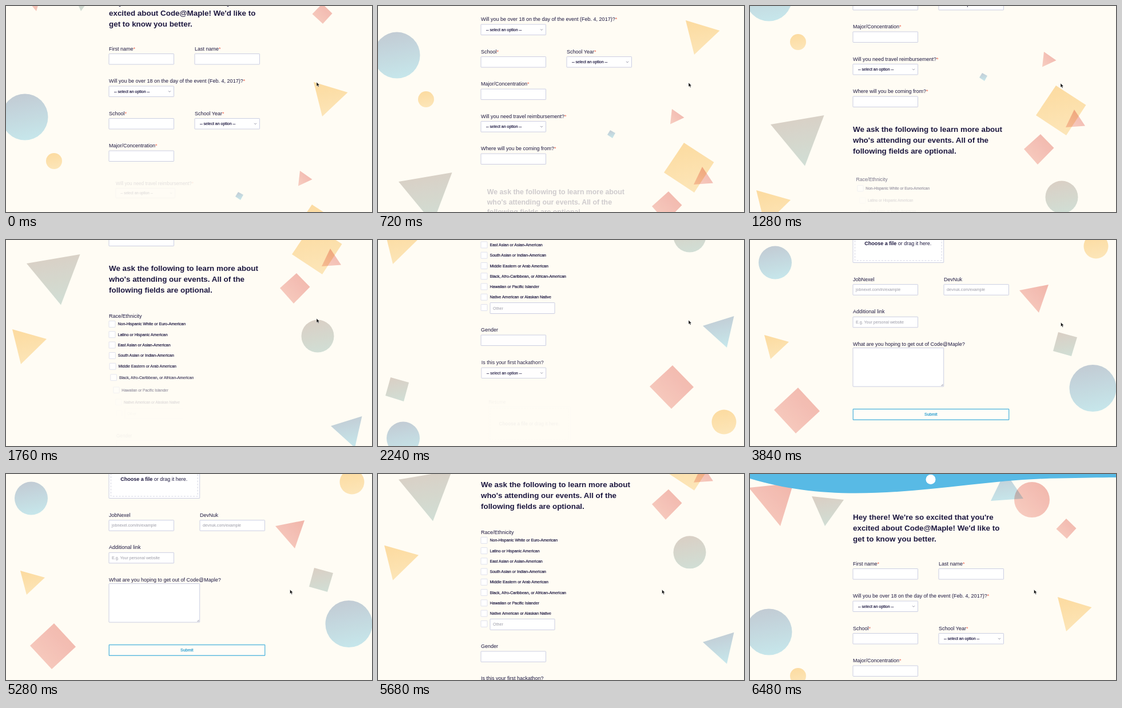
Recreate the animation shown at these times as an HTML page. Size 640 by 360 pixels, loop 6560 ms.

```html
<!DOCTYPE html>
<html lang="en">
<head>
<meta charset="utf-8">
<title>Registration form</title>
<style>
html, body { margin: 0; width: 100%; height: 100%; overflow: hidden; background: #fffcf4; }
svg { display: block; width: 100%; height: 100%; }
text { font: 9px "Liberation Sans", Arial, sans-serif; fill: #1d1840; white-space: pre; }
.head { font-size: 13.4px; font-weight: 700; }
.small { font-size: 7px; stroke: #1d1840; stroke-width: .2; }
.hint { font-size: 7.1px; fill: #9a9aa6; }
.submit { font-size: 7.2px; fill: #35a3d0; stroke: #35a3d0; stroke-width: .25; text-anchor: middle; }
.star { fill: #f0654f; }
.bold { font-weight: 700; }
.box { fill: #fff; stroke: #c6c9df; stroke-width: .9; }
.check { fill: #fff; stroke: #dcdeeb; stroke-width: .9; }
.dash { fill: none; stroke: #c9cbdc; stroke-width: .8; stroke-dasharray: 3 2.4; }
.line { fill: none; stroke: #77778c; stroke-width: .8; }
.button { fill: #fffdf8; stroke: #62bcdf; stroke-width: 1.4; }
#shapes > * { fill-opacity: .7; mix-blend-mode: multiply; }
</style>
</head>
<body>
<svg id="stage" viewBox="0 0 640 360" xmlns="http://www.w3.org/2000/svg">
  <defs id="defs"></defs>
  <rect width="640" height="360" fill="#fffcf4"/>
  <g id="page">
    <g id="shapes"></g>
    <path fill="#58bae5" d="M0-60V8C60 26 120 33.500 185 33.500C310 33.500 420 9 540 7.500C580 7 610 6 640 6V-60Z"/>
    <circle cx="316" cy="9.500" r="8.500" fill="#fff"/>
    <g id="form"></g>
  </g>
  <path id="cursor" d="M0 0V7.300L1.700 5.800L2.900 8.400L4.200 7.800L3.100 5.300H5.300Z" fill="#111" stroke="#fff" stroke-width=".5"/>
</svg>
<script>
(() => {
const LOOP = 6560, STEP = 80;
const $ = id => document.getElementById(id);

function add(parent, tag, attrs, str) {
  const el = document.createElementNS('http://www.w3.org/2000/svg', tag);
  for (const k in attrs) el.setAttribute(k, attrs[k]);
  if (str !== undefined) el.textContent = str;
  parent.appendChild(el);
  return el;
}

// Background shapes
const tints = {
  red: ['#eb9891', '#f4beb5'],
  yellow: ['#fbd083', '#fbdfa6'],
  blue: ['#a8b9cf', '#aee0f2'],
  grey: ['#cabfb8', '#bdd4d1']
};
for (const id in tints) {
  const flip = id === 'red';
  const grad = add($('defs'), 'linearGradient', {
    id, x1: flip ? 1 : .3, y1: 0, x2: flip ? 0 : .5, y2: 1
  });
  tints[id].forEach((c, i) => add(grad, 'stop', { offset: i, 'stop-color': c }));
}
const poly = (tint, points) => add($('shapes'), 'polygon', { points, fill: `url(#${tint})` });
const disc = (tint, cx, cy, r) => add($('shapes'), 'circle', { cx, cy, r, fill: `url(#${tint})` });

poly('red', '-2,24 76,16 53,91');
poly('grey', '108,39 164,45 131,91');
poly('blue', '446,-4 478,43 421,47');
disc('red', 493, 45, 31);
poly('red', '553,78 570.5,95 554,113 535.5,96');
poly('yellow', '538,215 597.5,233 553,275');
disc('blue', 33, 276, 40.5);
disc('yellow', 84, 353, 14);
poly('blue', '406,407 415,412 410,421 401,415');
poly('red', '514,370 535.5,385 511,396.5');
poly('yellow', '535,429 587.5,463 553,516 500,481');
poly('red', '567,471 586,499.5 552,502');
poly('red', '508,514 531.5,538 503,567 479,540');
disc('grey', 545, 624, 28.5);
poly('grey', '36,497 129.5,481 96,569.5');
poly('yellow', '11,612 71,629 26,673');
poly('blue', '568,781 622.5,764 610,819');
poly('red', '515,850 552,888 513,926 475,887');
disc('yellow', 605, 949, 21.5);
poly('grey', '22,871 54,880 45,913 13,903');
disc('blue', 44, 977.5, 29);
poly('red', '471,1026 522,1016 505,1065');
poly('grey', '539,1099 572,1108 562,1141 530,1132');
poly('yellow', '25,1104 68,1116 36,1146');
disc('blue', 599.5, 1197, 41);
poly('red', '84,1196 122,1237 80,1276 42,1235');

// Form parts
const reveals = [];
const LEFT = 180, FIELD_W = 113.5, FIELD_H = 18.5;
const rect = (g, cls, x, y, width, height) =>
  add(g, 'rect', { class: cls, x, y, width, height, rx: .6 });
const text = (g, x, y, str, cls = '') => add(g, 'text', { x, y, class: cls }, str);

// A group that fades, rises and grows into place at the given time
function reveal(start, cy) {
  const el = add($('form'), 'g', {});
  reveals.push({ el, start, cy });
  return el;
}
function label(g, x, y, str, required) {
  const el = text(g, x, y, str);
  if (required) add(el, 'tspan', { class: 'star' }, '*');
}
function input(g, x, y, str, required, hint) {
  label(g, x, y, str, required);
  rect(g, 'box', x, y + 6, FIELD_W, FIELD_H);
  if (hint) text(g, x + 5, y + 17.6, hint, 'hint');
}
function select(g, x, y, str, required) {
  input(g, x, y, str, required);
  text(g, x + 9, y + 17.7, '-- select an option --', 'small');
  add(g, 'path', { class: 'line', d: `M${x + 104} ${y + 14.3}l2 2l2-2` });
}
const heading = (g, y, lines) =>
  lines.forEach((s, i) => text(g, LEFT, y + i * 19.2, s, 'head'));

const intro = $('form');
heading(intro, 80, [
  "Hey there! We're so excited that you're",
  "excited about Code@Maple! We'd like to",
  'get to know you better.'
]);
input(intro, LEFT, 159.5, 'First name', true);
input(intro, 330, 159.5, 'Last name', true);
select(intro, LEFT, 216, 'Will you be over 18 on the day of the event (Feb. 4, 2017)?', true);
input(intro, LEFT, 272.5, 'School', true);
select(intro, 330, 272.5, 'School Year', true);
input(intro, LEFT, 329, 'Major/Concentration', true);
select(reveal(-120, 394), LEFT, 385.5, 'Will you need travel reimbursement?', true);
input(reveal(100, 450), LEFT, 442, 'Where will you be coming from?', true);
heading(reveal(560, 524), 510, [
  'We ask the following to learn more about',
  "who's attending our events. All of the",
  'following fields are optional.'
]);
label(reveal(1043, 589), LEFT, 592, 'Race/Ethnicity');

[
  'Non-Hispanic White or Euro-American',
  'Latino or Hispanic American',
  'East Asian or Asian-American',
  'South Asian or Indian-American',
  'Middle Eastern or Arab American',
  'Black, Afro-Caribbean, or African-American',
  'Hawaiian or Pacific Islander',
  'Native American or Alaskan Native',
  ''
].forEach((group, i) => {
  const y = 603 + i * 18.25;
  const g = reveal(1070 + i * 80, y);
  rect(g, 'check', LEFT, y - 5.5, 11, 11);
  if (group) return text(g, 195.5, y + 2.5, group, 'small');
  rect(g, 'box', 196, y - 8.5, 113, 19);
  text(g, 201, y + 3.5, 'Other', 'hint');
});

input(reveal(1700, 800), LEFT, 791, 'Gender');
select(reveal(1850, 856), LEFT, 847.5, 'Is this your first hackathon?');

const resume = reveal(2190, 935);
label(resume, LEFT, 904, 'Resume');
rect(resume, 'box', LEFT, 910, 158.7, 67.5);
rect(resume, 'dash', 183.5, 913.5, 151.7, 60.5);
const drop = text(resume, 200.3, 947, '');
add(drop, 'tspan', { class: 'bold' }, 'Choose a file');
add(drop, 'tspan', {}, ' or drag it here.');

const profiles = reveal(2270, 1018);
input(profiles, LEFT, 1009.7, 'JobNexel', false, 'jobnexel.com/in/example');
input(profiles, 339, 1009.7, 'DevNuk', false, 'devnuk.com/example');
input(reveal(2490, 1075), LEFT, 1066.3, 'Additional link', false, 'E.g. Your personal website');

const hopes = reveal(2600, 1154);
label(hopes, LEFT, 1122.8, 'What are you hoping to get out of Code@Maple?');
rect(hopes, 'box', LEFT, 1126.6, 158.7, 67.5);
add(hopes, 'path', { class: 'line', d: 'M334.500 1193l3-3M336.500 1193l1-1' });

const submit = reveal(3060, 1243);
rect(submit, 'button', LEFT + .3, 1233.5, 272.4, 18.8);
text(submit, 316.3, 1245.3, 'Submit', 'submit');

// Monotone cubic curve through [time, value] points
function curve(pts) {
  const n = pts.length - 1;
  const sec = i => (pts[i + 1][1] - pts[i][1]) / (pts[i + 1][0] - pts[i][0]);
  const slope = pts.map((_, i) => {
    if (i === 0) return sec(0);
    if (i === n) return 0;
    const a = sec(i - 1), b = sec(i);
    return a * b > 0 ? 2 * a * b / (a + b) : 0;
  });
  return t => {
    if (t <= pts[0][0]) return pts[0][1];
    if (t >= pts[n][0]) return pts[n][1];
    let i = 0;
    while (t >= pts[i + 1][0]) i++;
    const h = pts[i + 1][0] - pts[i][0], u = (t - pts[i][0]) / h, v = 1 - u;
    return v * v * ((1 + 2 * u) * pts[i][1] + u * h * slope[i]) +
           u * u * ((3 - 2 * u) * pts[i + 1][1] - v * h * slope[i + 1]);
  };
}

const scrollAt = curve([
  [0, 82], [500, 165], [1043, 230], [1160, 268], [1280, 290], [1440, 340],
  [1850, 486], [2160, 572], [2240, 631], [2490, 706], [2600, 762], [2880, 816],
  [3200, 902], [3600, 937], [3760, 938], [5200, 938], [5280, 935], [5400, 880],
  [5600, 600], [5900, 215], [6200, 45], [6480, 0]
]);
const cursorX = curve([
  [0, 543], [2240, 543], [2880, 543.5], [4000, 543.5], [4240, 451],
  [4640, 451], [4960, 510], [5120, 496.5]
]);
const cursorY = curve([
  [0, 133], [1280, 135], [2240, 140], [2880, 144], [4000, 144], [4240, 98],
  [4640, 98], [5120, 202]
]);

// cubic-bezier(.6, .2, .1, 1)
function ease(x) {
  if (x <= 0) return 0;
  if (x >= 1) return 1;
  const bez = (s, a, b) => 3 * (1 - s) * s * ((1 - s) * a + s * b) + s ** 3;
  let lo = 0, hi = 1;
  for (let i = 0; i < 18; i++) {
    const mid = (lo + hi) / 2;
    if (bez(mid, .6, .1) < x) lo = mid; else hi = mid;
  }
  return bez(lo, .2, 1);
}

function draw(t) {
  $('page').setAttribute('transform', `translate(0 ${-scrollAt(t)})`);
  $('cursor').setAttribute('transform', `translate(${cursorX(t)} ${cursorY(t)})`);
  for (const { el, start, cy } of reveals) {
    const p = ease((t - start) / 600), k = .9 + .1 * p;
    el.setAttribute('opacity', p);
    el.setAttribute('transform',
      `translate(316.5 ${cy + 10 * (1 - p)}) scale(${k}) translate(-316.5 ${-cy})`);
  }
}

const begin = performance.now();
function tick() {
  const t = (performance.now() - begin) % LOOP;
  draw(Math.floor(t / STEP) * STEP);
  requestAnimationFrame(tick);
}
tick();
})();
</script>
</body>
</html>
```
